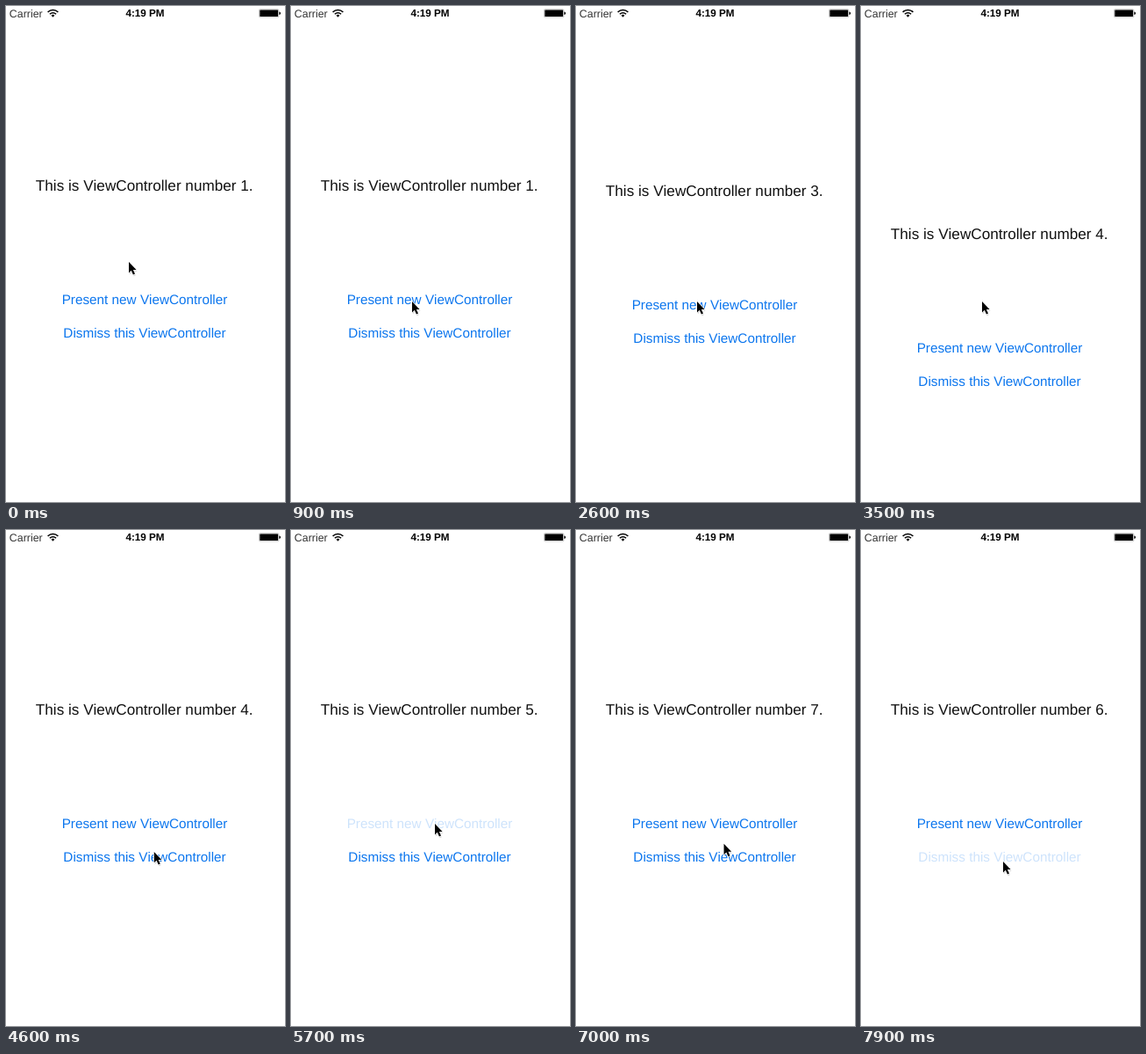
An HTML page that plays this animation: 318x564 px, repeating every 8000 ms.

```html
<!DOCTYPE html>
<html lang="en">
<head>
<meta charset="utf-8">
<title>Modal view controllers</title>
<style>
  html, body { margin: 0; width: 100%; height: 100%; overflow: hidden; background: #fff; }
  svg { display: block; width: 318px; height: 564px; }
  text {
    font-family: "Liberation Sans", Arial, sans-serif;
    font-kerning: none;
    text-rendering: geometricPrecision;
    text-anchor: middle;
  }
  .label { font-size: 17.15px; fill: #111; }
  .button { font-size: 15.3px; fill: #0c76ee; }
</style>
</head>
<body>
<svg viewBox="0 0 318 564">
  <defs>
    <g id="page">
      <rect width="318" height="564" fill="#fff"/>
      <text class="label" x="157.7" y="210"></text>
      <text class="button" x="158" y="339">Present new ViewController</text>
      <text class="button" x="158" y="377">Dismiss this ViewController</text>
    </g>
  </defs>
  <g id="views"></g>
  <g id="status">
    <text x="22.8" y="12.5" font-size="12.4" fill="#333">Carrier</text>
    <g fill="none" stroke="#000" stroke-width="1.5">
      <path d="M47.6 6.9a8.2 8.2 0 0 1 11.8 0"/>
      <path d="M49.9 9.2a5 5 0 0 1 7.2 0"/>
    </g>
    <path d="M53.5 12.8l-1.9-2.1a2.7 2.7 0 0 1 3.8 0z"/>
    <text x="158.5" y="12.3" font-size="11.7" font-weight="bold">4:19 PM</text>
    <rect x="288.5" y="3.8" width="22.4" height="9" rx="1.2" fill="#fff" stroke="#888" stroke-width=".5"/>
    <rect x="289.3" y="4.6" width="20.8" height="7.4" rx=".4"/>
    <path d="M311.4 6.6q1.6.3 1.6 1.7t-1.6 1.7z"/>
  </g>
  <g id="cursor">
    <path d="M.8 1.2v13l2.8-2.7 2 4.7 2.2-1-2-4.5h3.8z" fill="#000" opacity=".18"/>
    <path d="M0 0v12.4l2.8-2.7 2.1 4.8 2.1-.9-2.1-4.6h3.7z" stroke="#fff" stroke-width="1.5" paint-order="stroke"/>
  </g>
</svg>
<script>
const LOOP = 8000, HEIGHT = 564;
const DECAY = 0.01, SLIDE = 500;            // overdamped spring, cut off after SLIDE ms
const HOLD = 165, FADE = 400, DIMMED = 0.2; // button highlight
const TRAVEL = 350;                         // cursor trip

// Release times of the taps; the last two hit "Dismiss".
const taps = [1224, 2140, 3268, 5060, 5710, 6488, 7329, 8000];
const isDismiss = i => i >= taps.length - 2;

// Each tap shows the next or the previous view.
let number = 1;
const moves = taps.map((up, i) => {
  const from = number;
  number += isDismiss(i) ? -1 : 1;
  return { up, from, to: number, button: +isDismiss(i) };
});

// arrival time, x, y
const stops = [
  [0, 140, 291], [900, 138, 336], [4250, 170, 374],
  [4850, 164, 334], [7160, 172, 374], [7700, 162, 377]
];

const $ = id => document.getElementById(id);
const clamp = u => Math.min(1, Math.max(0, u));
const smooth = u => u * u * (3 - 2 * u);

function makeView() {
  const root = $('page').cloneNode(true);
  root.removeAttribute('id');
  $('views').append(root);
  const [label, ...buttons] = root.querySelectorAll('text');
  return { root, label, buttons };
}

function buttonAlpha(view, button, t) {
  const tap = moves.findLast(m => m.from === view && m.button === button && t >= m.up - HOLD);
  return tap ? DIMMED + (1 - DIMMED) * clamp((t - tap.up) / FADE) : 1;
}

function drawView(view, n, y, t) {
  view.label.textContent = `This is ViewController number ${n}.`;
  view.buttons.forEach((el, i) => el.setAttribute('opacity', buttonAlpha(n, i, t)));
  view.root.setAttribute('transform', `translate(0 ${y.toFixed(2)})`);
}

function cursorAt(t) {
  let [, x, y] = stops[0];
  for (const [arrive, nx, ny] of stops) {
    const e = smooth(clamp((t - arrive) / TRAVEL + 1));
    x += (nx - x) * e;
    y += (ny - y) * e;
  }
  return [x, y];
}

const under = makeView(), over = makeView();

function draw(t) {
  const { up, from, to } = moves.findLast(m => m.up <= t) || { up: -SLIDE, from: 1, to: 1 };
  const age = t - up;
  const left = age < SLIDE ? HEIGHT * Math.exp(-DECAY * age) : 0;
  drawView(under, Math.min(from, to), 0, t);
  drawView(over, Math.max(from, to), to < from ? HEIGHT - left : left, t);
  $('cursor').setAttribute('transform', `translate(${cursorAt(t)})`);
}

const begin = performance.now();
function tick() {
  draw((performance.now() - begin) % LOOP);
  requestAnimationFrame(tick);
}
tick();
</script>
</body>
</html>
```
